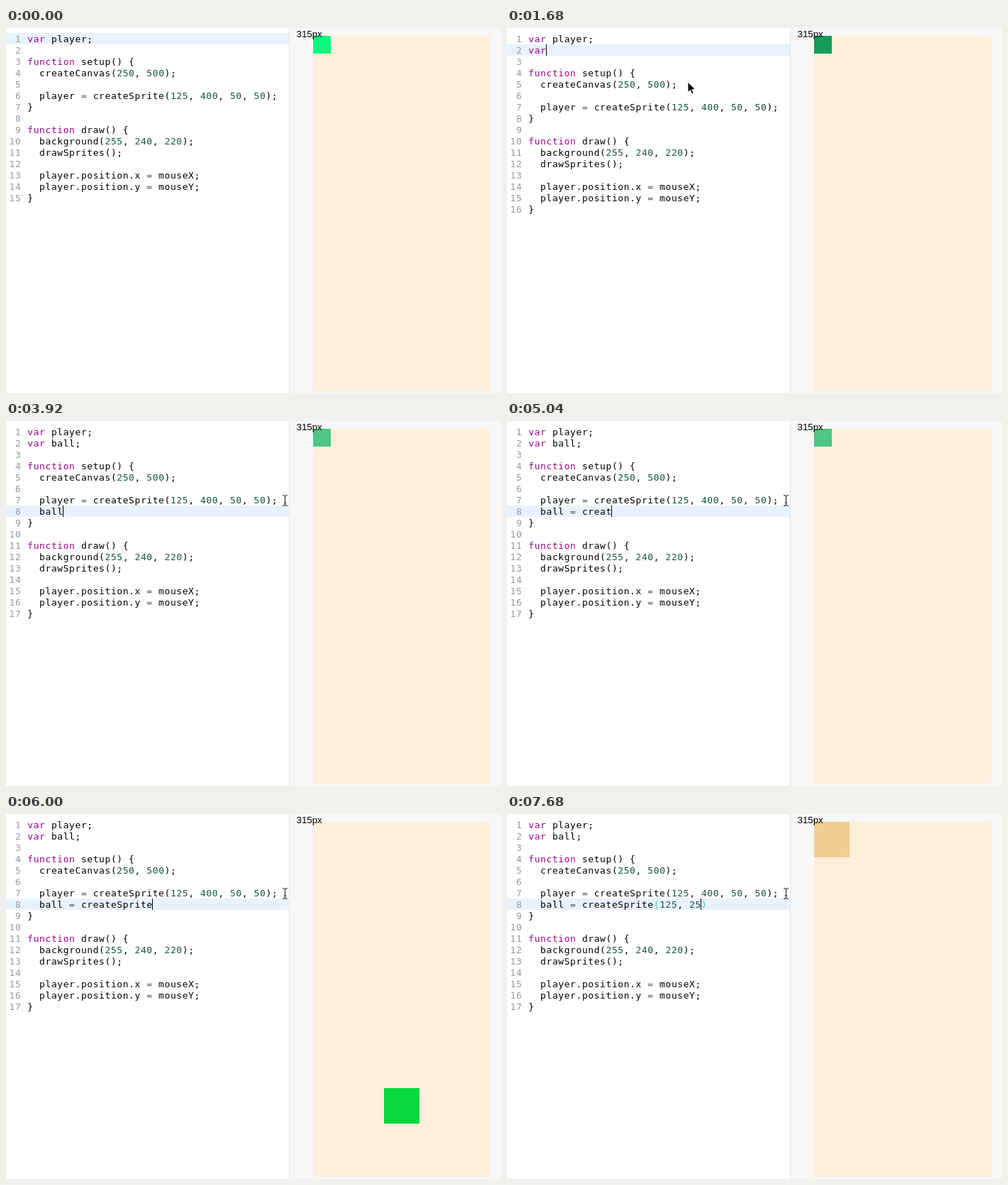
Animation, 698 px wide and 514 px high, one loop 8000 ms. Source, as an HTML page:

```html
<!DOCTYPE html>
<html lang="en">
<head>
<meta charset="utf-8">
<title>Live code editor</title>
<style>
  html, body { margin: 0; width: 100%; height: 100%; overflow: hidden; background: #fff; }
  #stage { position: relative; width: 698px; height: 514px; overflow: hidden; background: #fff; }
  #stage > * { position: absolute; }
  #code {
    left: 0; top: 7px; width: 399px;
    font: 13px/17px "DejaVu Sans Mono", "Noto Sans Mono", monospace;
    letter-spacing: .574px;
    color: #000; white-space: pre;
  }
  .line { position: relative; height: 16px; padding-left: 30.3px; }
  .line.active { background: #e8f2ff; }
  .num { position: absolute; left: 0; width: 21.3px; text-align: right; color: #999; }
  .key { color: #908; }
  .lit { color: #1a5346; }
  .op { color: #555; }
  .match { color: #2be08c; }
  #caret { width: 1px; height: 16px; background: #000; }
  #panel { left: 399px; top: 0; width: 298px; height: 514px; background: #f7f7f7; border-left: 1px solid #e3e3e3; }
  #sketch { left: 433px; top: 11px; width: 250px; height: 500px; background: #ffefdb; overflow: hidden; }
  #sprite { position: absolute; }
  #wait { left: 433px; top: 11px; font: 16px/18px "Liberation Serif", Times, serif; }
  #size { left: 409.5px; top: 1px; font: 13.3px/15px "Liberation Sans", Arial, sans-serif; }
  #pointer { left: 0; top: 0; overflow: visible; }
  .loading { background: #fbfbfb !important; }
  .loading .active { background: none; }
  .loading #panel, .loading #sketch { display: none; }
  #stage:not(.loading) #wait { display: none; }
</style>
</head>
<body>
<div id="stage">
  <div id="panel"></div>
  <div id="sketch"><div id="sprite"></div></div>
  <div id="wait">loading...</div>
  <div id="size">315px</div>
  <div id="code"></div>
  <div id="caret"></div>
  <svg id="pointer" width="1" height="1">
    <defs>
      <path id="bar" d="M-3.5-7.5Q0-7.5 0-5V5Q0 7.5-3.5 7.5M3.5-7.5Q0-7.5 0-5M3.5 7.5Q0 7.5 0 5M-2 3H2"/>
    </defs>
    <path id="arrow" d="M0 0V14.5L3.4 11.4L5.8 17L8.2 16L5.9 10.4H10.3Z" fill="#000" stroke="#fff"/>
    <g id="beam" fill="none">
      <use href="#bar" stroke="#fff" stroke-width="3" stroke-opacity=".7"/>
      <use href="#bar" stroke="#333" stroke-width="1.2"/>
    </g>
  </svg>
</div>
<script>
const LOOP = 8000, STEP = 80, CHAR = 8.4, ROW = 16, BLINK = 530;
const el = id => document.getElementById(id);

const HEAD = "var player;";
const SETUP = `

function setup() {
  createCanvas(250, 500);

  player = createSprite(125, 400, 50, 50);`;
const DRAW = `
}

function draw() {
  background(255, 240, 220);
  drawSprites();

  player.position.x = mouseX;
  player.position.y = mouseY;
}`;

// Text and the moment each character is typed
const declare = {
  text: "\nvar ball;",
  times: [1120, 1440, 1520, 1680, 1840, 1920, 2000, 2080, 2080, 2160]
};
const assign = {
  text: "\n  ball = createSprite(125, 25",
  times: [3520, 3520, 3520, 3600, 3680, 3760, 3920, 4160, 4240, 4400,
    4640, 4720, 4800, 4960, 5040, 5120, 5360, 5440, 5680, 5680, 5760, 5840,
    6320, 6880, 6960, 7120, 7280, 7360, 7520, 7680]
};
const CLICK = 3200;

const typed = (part, t) => part.text.slice(0, part.times.filter(k => k <= t).length);
const latest = (list, t) => list.filter(item => item[0] <= t).pop();

// Sketch runs: start, left, top, size, colour
const runs = [
  [0, -25, -25, 50, "#0bf87c"],
  [1360, -25, -25, 50, "#149c58"],
  [2640, -25, -25, 50, "#4fc784"],
  [4240, 100, 375, 50, "#4fc784"],
  [4320, -25, -25, 50, "#4fc784"],
  [6000, 100, 375, 50, "#08d93e"],
  [6080, -25, -25, 50, "#08d93e"],
  [6640, -50, -50, 100, "#f3cd8e"]
];

// Pointer path: time, x, y
const path = [
  [160, 14, 373], [800, 255, 76], [2320, 255, 76],
  [2880, 378.5, 73], [3200, 393.5, 112], [LOOP, 393.5, 112]
];

function pointerAt(t) {
  const i = path.findIndex(p => p[0] > t);
  const [t0, x0, y0] = path[i - 1], [t1, x1, y1] = path[i];
  const u = (t - t0) / (t1 - t0), e = u * u * (3 - 2 * u);
  return [x0 + (x1 - x0) * e, y0 + (y1 - y0) * e];
}

const span = (kind, text) => `<span class="${kind}">${text}</span>`;

function paint(text) {
  return text.replace(/\b(?:var|function)\b|\b\d+\b|=/g, word =>
    span(word === "=" ? "op" : /\d/.test(word) ? "lit" : "key", word));
}

function paintCall(text) {
  const open = text.indexOf("(");
  return paint(text.slice(0, open)) + span("match", "(") +
    paint(text.slice(open + 1)) + span("match", ")");
}

function drawCode(t) {
  const a = typed(declare, t), b = typed(assign, t);
  const lines = (HEAD + a + SETUP + b + DRAW).split("\n");
  const row = b ? 7 : t >= CLICK ? 6 : a ? 1 : 0;
  el("code").innerHTML = lines.map((text, i) => {
    const call = i === row && b.includes("(");
    return `<div class="line${i === row ? " active" : ""}">` +
      span("num", i + 1) + (call ? paintCall(text) : paint(text)) + "</div>";
  }).join("");

  const moves = [-600, ...declare.times, CLICK, ...assign.times];
  const since = t - moves.filter(k => k <= t).pop();
  const caret = el("caret").style;
  caret.left = Math.floor(30 + lines[row].length * CHAR) + "px";
  caret.top = 7 + row * ROW + "px";
  caret.visibility = since % (2 * BLINK) < BLINK ? "visible" : "hidden";
}

function drawSketch(t) {
  el("stage").classList.toggle("loading", t >= 5280 && t < 6000);
  const [, x, y, size, colour] = latest(runs, t);
  Object.assign(el("sprite").style, {
    left: x + "px", top: y + "px",
    width: size + "px", height: size + "px", background: colour
  });
}

function drawPointer(t) {
  const shown = t >= path[0][0], text = t >= 2400;
  el("pointer").style.display = shown ? "block" : "none";
  if (!shown) return;
  const [x, y] = pointerAt(t);
  el("pointer").style.transform = `translate(${x}px, ${y}px)`;
  el("arrow").style.display = text ? "none" : "inline";
  el("beam").style.display = text ? "inline" : "none";
}

const start = performance.now();
let shownAt = -1;

function tick() {
  const now = (performance.now() - start) % LOOP;
  const t = Math.floor(now / STEP) * STEP;
  if (t !== shownAt) {
    shownAt = t;
    drawCode(t);
    drawSketch(t);
    drawPointer(t);
  }
  requestAnimationFrame(tick);
}
tick();
</script>
</body>
</html>
```
